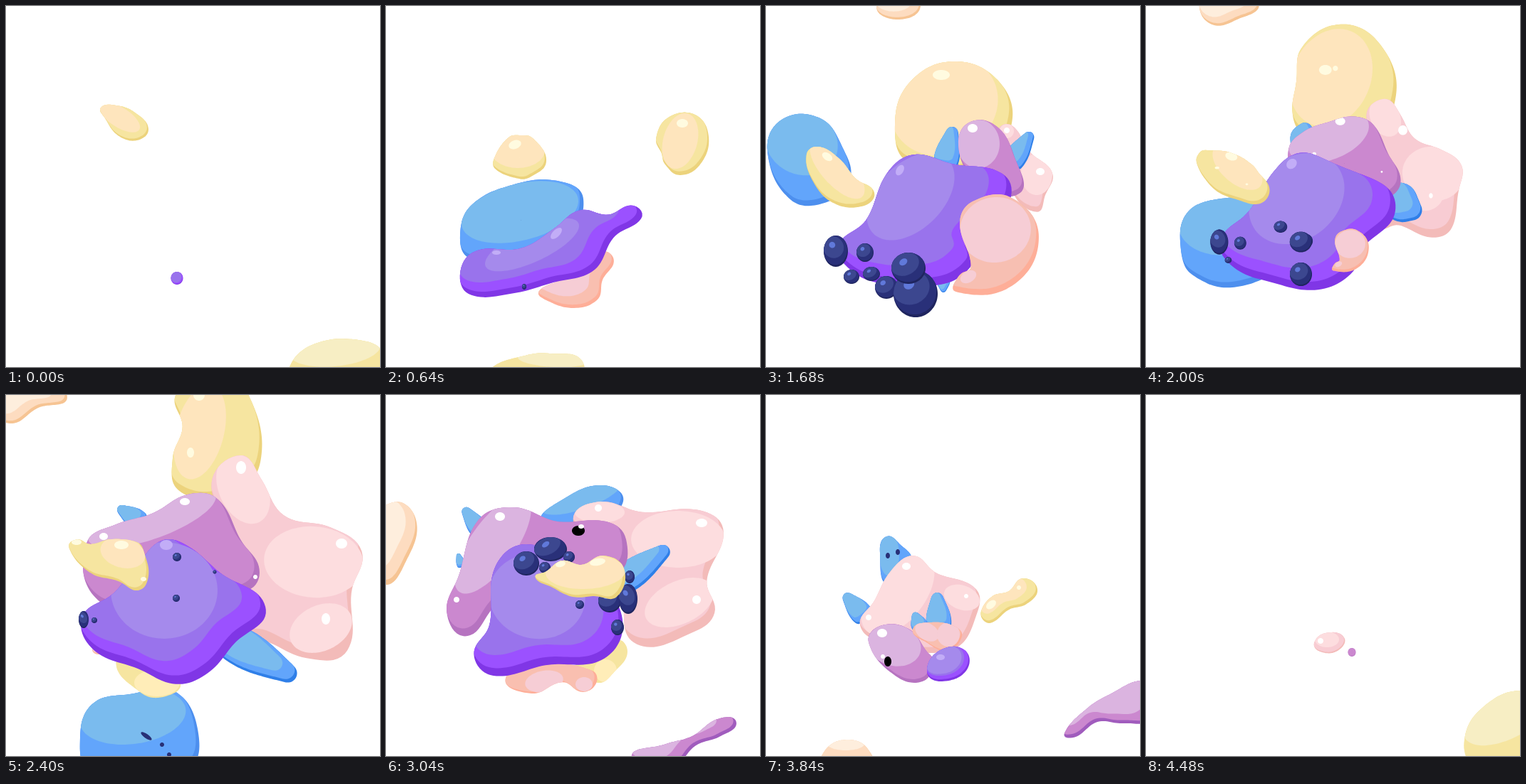
These frames come from a looping animation (525x508 px, 4.56 s). An HTML page with a canvas:

```html
<!DOCTYPE html>
<html lang="en">
<head>
<meta charset="utf-8">
<title>Blobs</title>
<style>
html, body { margin: 0; width: 525px; height: 508px; overflow: hidden; background: #fff; }
canvas { display: block; }
</style>
</head>
<body>
<canvas id="stage" width="525" height="508"></canvas>
<script>
const LOOP = 4560, STEP = 80, N = 72;
const ctx = document.getElementById('stage').getContext('2d');
const bodies = [];

function oval([x, y, rx = .1, ry = rx, turn = 0]) {
  const a = turn * Math.PI / 180, c = Math.cos(a), s = Math.sin(a);
  return Array.from({ length: N }, (_, i) => {
    const u = i / N * 2 * Math.PI, p = rx * Math.cos(u), q = ry * Math.sin(u);
    return [x + p * c - q * s, y + p * s + q * c];
  });
}

// Smooth closed curve through the points, sampled evenly along its length.
function curve(pts) {
  const n = pts.length, at = i => pts[(i + n) % n], dense = [];
  const tangent = i => {
    const a = at(i - 1), b = at(i + 1), d = Math.hypot(b[0] - a[0], b[1] - a[1]) || 1;
    return [(b[0] - a[0]) / d, (b[1] - a[1]) / d];
  };
  for (let i = 0; i < n; i++) {
    const a = at(i), b = at(i + 1), ta = tangent(i), tb = tangent(i + 1);
    const h = Math.hypot(b[0] - a[0], b[1] - a[1]) * .38;
    for (let k = 0; k < 16; k++) {
      const u = k / 16, v = 1 - u;
      dense.push([0, 1].map(j => v * v * v * a[j] + 3 * v * v * u * (a[j] + ta[j] * h) +
        3 * v * u * u * (b[j] - tb[j] * h) + u * u * u * b[j]));
    }
  }
  dense.push(dense[0]);
  const len = [0];
  for (let i = 1; i < dense.length; i++)
    len.push(len[i - 1] + Math.hypot(dense[i][0] - dense[i - 1][0], dense[i][1] - dense[i - 1][1]));
  const total = len[len.length - 1], out = [];
  for (let i = 0, j = 0; i < N; i++) {
    const d = total * i / N;
    while (len[j + 1] < d) j++;
    const u = (d - len[j]) / (len[j + 1] - len[j] || 1);
    out.push(dense[j].map((v, k) => v + (dense[j + 1][k] - v) * u));
  }
  let area = 0;
  out.forEach((p, i) => { const q = out[(i + 1) % N]; area += p[0] * q[1] - q[0] * p[1]; });
  return area < 0 ? out.reverse() : out;
}

// Two to five numbers make an oval, more make a curve.
function shape(text) {
  const v = text.trim().split(/\s+/).map(Number);
  if (v.length < 6) return oval(v);
  return curve(Array.from({ length: v.length / 2 }, (_, i) => [v[2 * i], v[2 * i + 1]]));
}

const middle = s => [0, 1].map(k => s.reduce((sum, p) => sum + p[k], 0) / N);

// Copy of an outline, scaled and moved towards the light by parts of its size.
function shade(s, [scale, dx, dy]) {
  const shift = [dx, dy];
  const box = [0, 1].map(k => {
    const v = s.map(p => p[k]), lo = Math.min(...v), hi = Math.max(...v);
    return { mid: (lo + hi) / 2, size: hi - lo };
  });
  return s.map(p => p.map((v, k) => box[k].mid + (v - box[k].mid) * scale + shift[k] * box[k].size));
}
const MAIN = [.98, -.02, -.05], MID = [.88, -.07, -.1], LIGHT = [.82, -.1, -.12];

// Turn the start of b so that its points pair up with those of a.
function align(a, b) {
  const ca = middle(a), cb = middle(b);
  let best = 0, least = Infinity;
  for (let s = 0; s < N; s++) {
    let sum = 0;
    for (let i = 0; i < N; i += 3) {
      const p = a[i], q = b[(i + s) % N];
      sum += (p[0] - ca[0] - q[0] + cb[0]) ** 2 + (p[1] - ca[1] - q[1] + cb[1]) ** 2;
    }
    if (sum < least) { least = sum; best = s; }
  }
  return b.slice(best).concat(b.slice(0, best));
}

// Shades run from dark to light; spots lie on top of them.
function body(shades, spots = '') {
  const tones = shades.split(' '), extra = spots ? spots.split(' ') : [];
  bodies.push({ colors: tones.concat(extra), tones: tones.length, spots: extra.length, keys: [] });
}

// Pose of the latest body: outline / light / spots.
function at(t, text) {
  const { keys, tones, spots } = bodies[bodies.length - 1];
  const parts = text.split('/'), has = i => parts[i] && parts[i].trim();
  const line = shape(parts[0]), layers = [line, shade(line, MAIN)];
  if (tones > 3) layers.push(shade(line, MID));
  layers.push(has(1) ? shape(parts[1]) : shade(line, LIGHT));
  for (let i = 2; i < spots + 2; i++) layers.push(has(i) ? shape(parts[i]) : oval(middle(line)));
  const prev = keys[keys.length - 1];
  keys.push({ t, layers: prev ? layers.map((l, j) => align(prev.layers[j], l)) : layers });
}

// Cone with a round tip, from the middle of its foot to the tip.
function fin(t, x, y, tipX, tipY, w) {
  const d = Math.hypot(tipX - x, tipY - y), ux = (tipX - x) / d, uy = (tipY - y) / d;
  const p = (along, side) => `${x + ux * along - uy * side} ${y + uy * along + ux * side}`;
  at(t, [p(0, w), p(d - w * .4, w * .5), p(d, 0), p(d - w * .4, -w * .5), p(0, -w), p(-w * .4, 0)].join(' '));
}

function ball(t, x, y, rx = .1, ry = rx) {
  at(t, `${x} ${y} ${rx} ${ry}/${x - rx * .2} ${y - ry * .25} ${rx * .85} ${ry * .7} -25/` +
    `${x - rx * .3} ${y - ry * .4} ${rx * .25} ${ry * .2} -35`);
}

const YELLOW = '#ecd37c #f6e5a0 #fee5bd', GLOSS = '#fffbe0 #fffbe0 #fffbe0';
const FIN = '#2f7fe8 #62a5fb #7abbee', NAVY = '#1f255f #293079 #3c478f';

// large yellow
body(YELLOW, GLOSS);
at(160, '405 215');
at(640, '379 187 396 157 434 153 453 184 441 223 412 238 391 222 387 208/413 190 24 40 15/416 165 8 6');
at(1680, '181 166 202 107 262 78 325 104 345 165 300 225 200 220/250 140 78 68 -30/246 97 12 7');
at(2400, '238 0 290 -40 338 -5 357 95 310 142 243 135 234 88 248 45/272 52 34 68 14/259 81 5 7/271 0 8');
at(2800, '340 -70 45 50');

// peach
body('#f6c493 #fddcc0 #feeedd');
at(1280, '300 -40 30 25');
at(1680, '155 0 190 -35 217 0 185 19');
at(2400, '-20 -20 40 -20 86 2 45 18 5 40 -25 10');
at(3040, '-40 200 10 151 42 175 30 230 -5 266');
at(3840, '77 510 105 486 143 498 150 550 80 540/112 491 26 9');
at(4160, '200 570 40 30');

// drifting mauve
body('#a05cbd #cb88cf #dbb4e0');
at(2640, '250 560 50 22 -20');
at(3040, '345 512 390 492 430 480 465 456 492 460 470 480 435 493 400 525');
at(3840, '418 478 452 440 485 420 525 402 560 410 550 455 500 462 465 460 435 481');
at(4160, '610 400 45 35');

// yellow along the bottom
body('#f6e5a0 #f6e5a0 #f7eec4');
at(4160, '640 400 60 60');
at(4480, '447 485 470 442 525 416 580 440 560 530 460 520/515 440 80 38 -32');
at(4560, '398 508 432 476 495 470 530 490 520 545 410 530/462 484 64 23 -6');
at(5200, '145 512 195 492 230 489 276 500 260 535 150 535/235 497 50 11 3');
at(5520, '110 560 60 25');

// blue
body('#4d8fee #62a5fb #7abbee', '#283077 #283077 #283077');
at(160, '200 330');
at(640, '104 322 120 280 180 251 240 246 277 270 250 330 180 352 117 355/188 290 84 40 -14');
at(1680, '2 205 22 160 76 158 108 200 118 245 85 276 35 273/50 192 52 45 25');
at(2400, '104 482 122 434 175 421 235 416 269 470 255 525 120 530/178 452 75 39 -8/197 480 9 3 35/219 492 3/229 506 3');
at(3040, '220 180 250 146 305 127 333 150 290 180/275 142 60 18 -20');
at(3840, '160 222 169 199 189 211 204 232 175 270/173 225 14 30/171 226 3 4/185 221 3 4');
at(4240, '225 330');

// lower yellow
body('#f6e5a0 #f6e5a0 #ffedb8');
at(2080, '220 370');
at(2400, '155 373 200 350 245 405 220 425 188 418/212 405 32 19');
at(3040, '266 380 325 345 339 362 322 388 297 405/308 388 16');
at(3440, '270 350');

// left fin
body(FIN);
at(1120, '270 260');
fin(1680, 252, 222, 263, 170, 17);
fin(2400, 188, 178, 157, 158, 14);
fin(3040, 133, 192, 109, 159, 13);
fin(3840, 137, 311, 110, 280, 15);
at(4240, '210 345');

// pink
body('#f3bbb9 #f8ccd3 #fddddf', '#fddddf #fddddf #fff #fff #fff');
at(1040, '330 280');
at(1680, '326 175 345 168 370 205 402 235 392 266 380 290 345 260/380 237 22 29/338 176 10//385 233 6 5/338 175 4');
at(2400, '288 130 328 84 358 118 390 170 455 186 500 220 485 275 478 362 420 370 350 345 310 375 340 250/432 235 70 50 5/333 132 34 52 -25/442 328 46 32 -25/330 102 7 9/471 209 8 7/449 315 6 8');
at(3040, '262 175 300 150 360 165 440 162 474 190 450 262 462 305 435 332 350 350 330 280 300 210/410 203 66 40/300 165 35 15/412 292 52 30 -25/298 159 5/443 180 8 6/436 288 6');
at(3840, '132 325 152 290 175 248 207 226 238 250 294 272 297 305 262 358 170 350/185 280 68 38 -52/275 285 26 17 20//197 241 6 5/281 283 3/144 313 4');
at(4480, '236 349 252 335 278 341 269 360 244 361/254 344 17 11///245 346 4');

// right fin
body(FIN);
at(1120, '310 270');
fin(1680, 346, 220, 373, 178, 15);
fin(2400, 318, 348, 407, 398, 26);
fin(3040, 332, 262, 397, 215, 20);
fin(3840, 243, 326, 240, 278, 17);
at(4240, '245 345');

// small fin
body(FIN);
at(1280, '249 380');
fin(1680, 249, 385, 249, 403, 9);
fin(3040, 106, 240, 101, 223, 6);
fin(3840, 216, 326, 208, 306, 11);
at(4080, '225 335');

// mauve
body('#b673c0 #cb88cf #dbb4e0', '#fff #fff #000 #fff');
at(1040, '290 280');
at(1680, '270 195 285 164 322 168 348 210 354 265 290 240/298 194 30 34/290 172 7 6');
at(2400, '113 208 155 182 205 167 255 140 297 146 330 205 356 245 340 275 200 300 125 285/205 172 95 30 -20/251 150 7 5/137 199 6 5//350 256 3');
at(3040, '85 305 102 255 130 175 180 158 240 178 310 178 337 202 325 250 200 250 150 300 112 340/150 210 32 82 35/160 171 7 6/99 288 4/270 191 9 7/274 185 4 3');
at(3840, '144 348 160 325 200 329 225 360 235 375 220 403 180 394/180 352 38 29 15/163 335 7 6//171 375 5 7/164 368 3');
at(4480, '289 362 5.5 6/289 362');

// salmon behind
body('#feae98 #f9bfb0 #f6cdd5', '#f6cdd5');
at(240, '265 380');
at(640, '214 402 240 388 285 375 303 346 320 358 304 385 297 413 262 425 221 412');
at(1120, '280 350');
at(2160, '200 350');
at(2400, '130 358 9 7');
at(3040, '168 398 220 378 290 388 295 406 275 418 248 404 205 420/222 403 27 15 -10/278 407 12 10');
at(3840, '206 330 232 320 266 326 275 340 255 360 225 348/226 333 18 12 30/256 337 16 17');
at(4240, '255 350');

// purple
body('#8036e6 #9b51ff #9973ec #a58aec', '#c2adf7 #c2adf7');
at(0, '240 383 8.5 9/240 383');
at(640, '104 375 125 345 190 341 235 314 272 287 312 294 345 280 360 297 320 325 292 372 235 389 180 404 117 406/205 336 72 24 -25/239 320 10 5 -45/155 347 6 3');
at(1680, '101 335 140 302 170 235 207 209 260 222 335 238 340 280 285 340 289 365 245 392 150 388 107 360/203 268 74 46 -45/188 231 5 8 30');
at(2400, '107 312 150 280 185 238 220 204 256 213 300 250 365 300 320 350 285 390 240 407 185 385 122 358/222 275 75 68/225 211 9 7');
at(3040, '123 365 145 325 154 240 200 210 280 250 331 310 308 370 225 380 150 395/212 283 68 60 10');
at(3840, '226 390 243 360 279 359 281 388 245 403//245 369 6 4');
at(4240, '275 365');

// salmon in front
body('#feae98 #f7bfb2 #f6cdd5', '#f6cdd5');
at(1040, '300 350');
at(1680, '272 305 290 275 345 270 383 325 345 394 265 402 272 378 288 368/322 315 50 46 -10/284 381 12 8 -30');
at(2240, '260 350');

// navy balls
const newBall = () => body(NAVY, '#6079da');
newBall();
ball(480, 194, 395);
ball(640, 194, 395, 3, 4);
ball(1680, 98, 345, 17, 22);
ball(2400, 109, 316, 7, 12);
ball(3040, 197, 237, 18, 17);
ball(3520, 220, 320);
newBall();
ball(1120, 160, 350);
ball(1680, 139, 347, 12, 13);
ball(2400, 124, 317, 4);
ball(3040, 223, 243, 8);
ball(3440, 230, 320);
newBall();
ball(1200, 145, 380);
ball(1680, 120, 381, 11, 10);
ball(2240, 112, 340);
newBall();
ball(1200, 170, 370);
ball(1680, 148, 377, 12, 10);
ball(2400, 240, 228, 6);
ball(3040, 231, 217, 23, 17);
ball(3520, 230, 320);
newBall();
ball(1200, 190, 390);
ball(1680, 169, 396, 16);
ball(2400, 293, 249, 2.5);
ball(3040, 257, 228, 8);
ball(3440, 250, 320);
newBall();
ball(1120, 215, 390);
ball(1680, 210, 405, 31, 33);
ball(2320, 225, 350);
newBall();
ball(1120, 210, 370);
ball(1680, 200, 369, 24, 22);
ball(2400, 239, 286, 5);
ball(3040, 272, 295, 6);
ball(3440, 260, 340);

function lateBall(x, y, rx, ry) {
  newBall();
  ball(2560, x - 40, y + 10);
  ball(3040, x, y, rx, ry);
  ball(3480, 270, 340);
}
lateBall(314, 290, 16, 16);
lateBall(340, 287, 13, 21);
lateBall(342, 256, 7, 9);
lateBall(325, 327, 9, 11);

// yellow in front
body(YELLOW, GLOSS);
at(0, '133 143 155 140 181 150 200 173 184 189 157 182 139 158/160 157 32 14 32');
at(640, '152 214 172 185 189 182 206 186 225 219 202 241 186 243 153 229/185 203 38 25/181 195 9 6 -20');
at(1680, '57 208 74 198 103 215 126 243 152 262 138 281 96 278 66 247/100 230 52 22 48/86 212 8 5 35');
at(2400, '88 214 100 203 118 210 148 203 186 208 194 222 200 255 186 275 158 262 118 250/164 222 32 21 15/162 211 10 6/193 259 4 3/99 207 7 4');
at(3040, '209 256 224 249 247 233 275 239 305 226 334 244 324 284 293 283 262 284 232 270/280 249 56 24 -2/297 235 11 5 -10/245 238 7 4 -15');
at(3840, '302 304 318 283 341 276 360 258 381 273 366 294 341 302 318 320 306 318//316 295 8 5 -40/355 271 3');
at(4320, '400 300');

function trace(a, b, u) {
  const p = a.map(([x, y], i) => [x + (b[i][0] - x) * u, y + (b[i][1] - y) * u]);
  const mid = i => {
    const q = p[i % N], r = p[(i + 1) % N];
    return [(q[0] + r[0]) / 2, (q[1] + r[1]) / 2];
  };
  ctx.beginPath();
  ctx.moveTo(...mid(N - 1));
  for (let i = 0; i < N; i++) ctx.quadraticCurveTo(...p[i], ...mid(i));
  ctx.closePath();
}

function draw(time) {
  ctx.fillStyle = '#fff';
  ctx.fillRect(0, 0, 525, 508);
  for (const { colors, keys } of bodies) {
    const t = time < keys[0].t ? time + LOOP : time;
    if (t > keys[keys.length - 1].t) continue;
    const i = Math.max(1, keys.findIndex(k => k.t >= t));
    const a = keys[i - 1], b = keys[i], u = (t - a.t) / (b.t - a.t);
    ctx.save();
    colors.forEach((color, j) => {
      trace(a.layers[j], b.layers[j], u);
      ctx.fillStyle = color;
      ctx.fill();
      if (j === 0) ctx.clip();
    });
    ctx.restore();
  }
}

const start = performance.now();
function tick() {
  const t = (performance.now() - start) % LOOP;
  draw(Math.floor(t / STEP) * STEP);
  requestAnimationFrame(tick);
}
tick();
</script>
</body>
</html>
```
